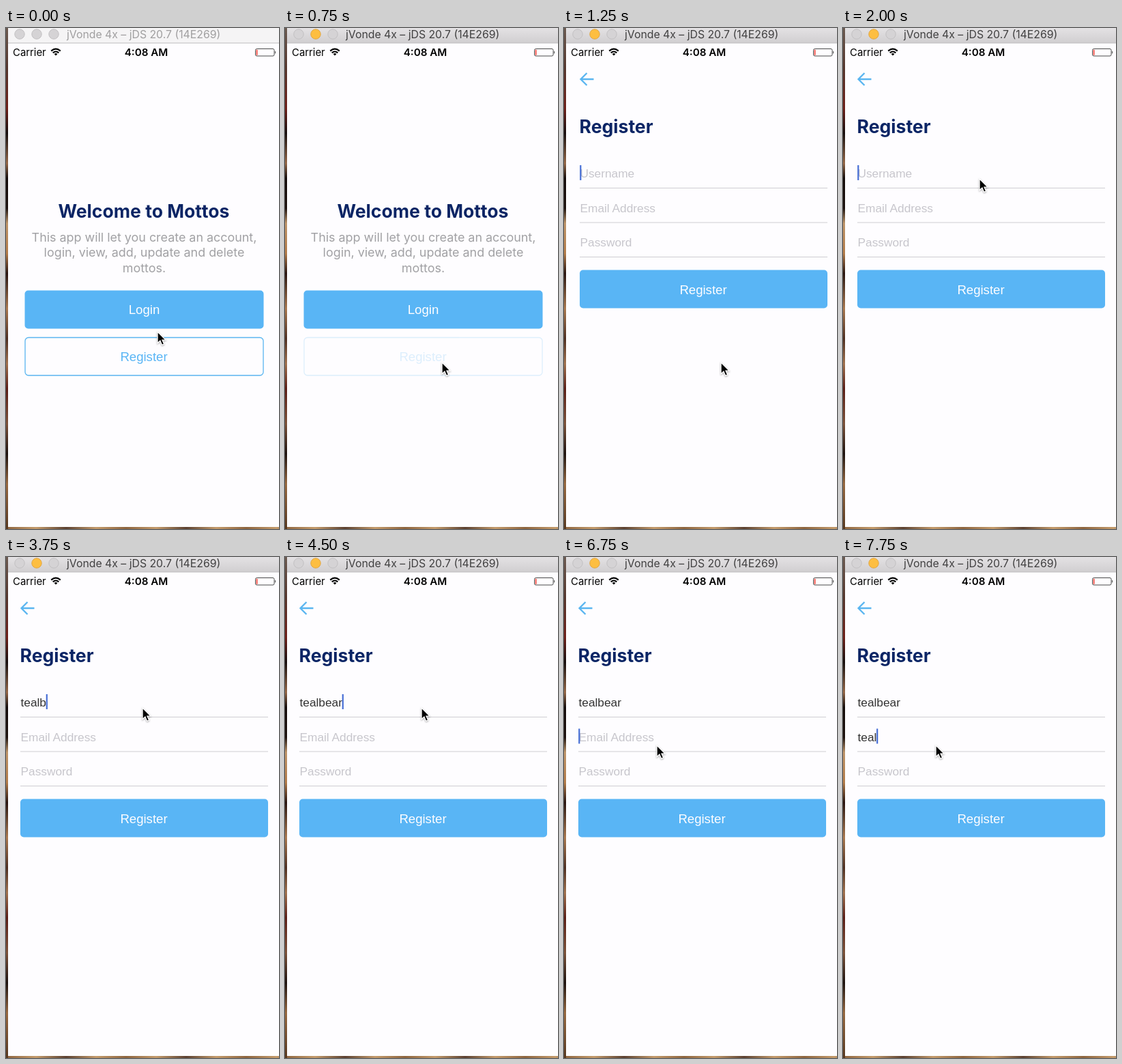
An HTML page that plays this animation: 400x734 px, repeating every 8 s.

```html
<!DOCTYPE html>
<html lang="en">
<head>
<meta charset="utf-8">
<title>Register flow</title>
<style>
  html, body { margin: 0; height: 100%; overflow: hidden; background: #fefdff; }
  svg { display: block; font-family: Inter, sans-serif; }
  .mid { text-anchor: middle; }
  .heading { font-size: 26.6px; font-weight: 700; fill: #0b2565; }
  .intro { font-size: 17.9px; fill: #a1a1a4; }
  .button { font: 18.6px "Liberation Sans", sans-serif; }
  .field { font: 17.3px "Liberation Sans", sans-serif; }
  .blue { fill: #59b5f5; }
  .white { fill: #fefdff; }
  .lights circle { fill: #d5d3d5; stroke: #c2c0c2; }
</style>
</head>
<body>
<svg width="400" height="734" viewBox="0 0 400 734">
  <defs>
    <linearGradient id="side" x1="0" y1="0" x2="0" y2="1">
      <stop offset="0" stop-color="#6b5a50"/>
      <stop offset=".08" stop-color="#54362c"/>
      <stop offset=".16" stop-color="#6d1f18"/>
      <stop offset=".21" stop-color="#140c0b"/>
      <stop offset=".27" stop-color="#946746"/>
      <stop offset=".3" stop-color="#120a08"/>
      <stop offset=".36" stop-color="#1c110d"/>
      <stop offset=".39" stop-color="#bd9468"/>
      <stop offset=".45" stop-color="#b27b48"/>
      <stop offset=".49" stop-color="#27130e"/>
      <stop offset=".56" stop-color="#a9784e"/>
      <stop offset=".62" stop-color="#4d2e20"/>
      <stop offset=".67" stop-color="#a0714d"/>
      <stop offset=".72" stop-color="#5a1d15"/>
      <stop offset=".79" stop-color="#7b5138"/>
      <stop offset=".85" stop-color="#1b100c"/>
      <stop offset=".91" stop-color="#96683f"/>
      <stop offset="1" stop-color="#55371f"/>
    </linearGradient>
    <linearGradient id="floor" spreadMethod="reflect" x2=".22">
      <stop offset="0" stop-color="#8d643e"/>
      <stop offset=".5" stop-color="#c49b6b"/>
      <stop offset="1" stop-color="#5b4030"/>
    </linearGradient>
    <linearGradient id="activeBar" x1="0" y1="0" x2="0" y2="1">
      <stop stop-color="#e4e2e4"/>
      <stop offset="1" stop-color="#d0ced0"/>
    </linearGradient>
    <clipPath id="window"><rect x="3" width="397" height="731"/></clipPath>
  </defs>

  <rect width="400" height="734" fill="url(#floor)"/>
  <rect width="3" height="734" fill="url(#side)"/>

  <g clip-path="url(#window)">
    <rect class="white" width="400" height="731"/>

    <g id="welcome">
      <text class="heading mid" x="202" y="278">Welcome to Mottos</text>
      <g class="intro mid">
        <text x="202.5" y="313">This app will let you create an account,</text>
        <text x="202.5" y="335">login, view, add, update and delete</text>
        <text x="202.5" y="358">mottos.</text>
      </g>
      <rect class="blue" x="27.5" y="384.5" width="350" height="56" rx="5"/>
      <text class="button mid white" x="202.5" y="419">Login</text>
      <g id="registerLink">
        <rect x="28" y="453.5" width="349" height="55.5" rx="5" fill="none" stroke="#59b5f0" stroke-width="1.3"/>
        <text class="button mid blue" x="202" y="488">Register</text>
      </g>
    </g>

    <g id="form">
      <rect class="white" x="3" y="22" width="400" height="712"/>
      <path d="M41.5 75H23M31.5 66L22.5 75L31.5 84" fill="none" stroke="#59b5f0" stroke-width="2.3"/>
      <text class="heading" x="20.5" y="154">Register</text>
      <path d="M21 234.5H384M21 285H384M21 335.5H384" stroke="#cfced2"/>
      <g class="field">
        <text id="username" x="21.5" y="219"></text>
        <text id="email" x="21.5" y="269.5"></text>
        <text x="21.5" y="320" fill="#c7c6cc">Password</text>
      </g>
      <rect id="caret" width="2.2" height="22" fill="#486fd6"/>
      <rect class="blue" x="21" y="354.5" width="363" height="56" rx="5"/>
      <text class="button mid white" x="202" y="389.5">Register</text>
    </g>

    <rect id="bar" x="3" width="397" height="22"/>
    <path d="M3 22H400" stroke="#bcbabc"/>
    <g class="lights">
      <circle cx="20" cy="9" r="7.2"/>
      <circle id="minimize" cx="45" cy="9" r="7.2"/>
      <circle cx="70" cy="9" r="7.2"/>
    </g>
    <text id="title" x="89" y="15" font-size="15.8">jVonde 4x – jDS 20.7 (14E269)</text>

    <text x="10" y="41" font-size="14.9">Carrier</text>
    <g fill="none" stroke="#000" stroke-width="2.1">
      <path d="M66.2 33.6Q73 27.6 79.8 33.6M68.7 36.4Q73 32.6 77.3 36.4"/>
      <path d="M70.6 37.9Q73 36 75.4 37.9L73 40.6Z" fill="#000" stroke="none"/>
    </g>
    <text class="mid" x="205.5" y="41" font-size="15.2" font-weight="600">4:08 AM</text>
    <rect x="365.5" y="30.5" width="27.5" height="10.5" rx="2" fill="none" stroke="#4a4a4a"/>
    <rect x="366.8" y="31.8" width="1.6" height="8" fill="#f0392f"/>
    <path d="M394.2 33.5Q396.2 35.7 394.2 38Z" fill="#333"/>
  </g>

  <path id="pointer" d="M0 0V16.8L3.9 13.2L6.6 19.4L9.6 18.1L7 12.1H12Z" stroke="#fff" stroke-width="1.3"
        style="filter:drop-shadow(0 1px 1px #0005)"/>
</svg>
<script>
const LOOP = 8000, STEP = 250;
const $ = id => document.getElementById(id);
const set = (id, attrs) => {
  for (const name in attrs) $(id).setAttribute(name, attrs[name]);
};

// time, x, y
const pointerPath = [
  [0, 222, 445], [500, 230, 490], [1250, 230, 490], [2000, 200, 221],
  [4500, 200, 221], [5250, 136, 277], [6500, 136, 277], [6750, 136, 276], [LOOP, 136, 276]
];

function pointerAt(t) {
  const i = pointerPath.findIndex(p => p[0] > t);
  const [t0, x0, y0] = pointerPath[i - 1], [t1, x1, y1] = pointerPath[i];
  const u = (t - t0) / (t1 - t0), k = u * u * (3 - 2 * u);
  return [x0 + (x1 - x0) * k, y0 + (y1 - y0) * k];
}

function typeInto(id, word, hint, start, t) {
  const count = Math.max(0, Math.floor((t - start) / STEP));
  $(id).textContent = word.slice(0, count) || hint;
  set(id, { fill: count ? '#333' : '#c7c6cc' });
  return count ? $(id).getComputedTextLength() : 0;
}

function draw(t) {
  const active = t >= 500;
  set('bar', { fill: active ? 'url(#activeBar)' : '#f5f4f5' });
  set('title', { fill: active ? '#414041' : '#a09fa0' });
  $('minimize').style.cssText = active ? 'fill:#fdbe41;stroke:#e2a640' : '';

  const slide = t < 1000 ? 400 : t < 1250 ? 46.5 : t < 1500 ? 2 : 0;
  const progress = 1 - slide / 400;
  const scale = 1 - 0.057 * progress;
  set('form', { transform: `translate(${slide} 0)` });
  set('welcome', {
    transform: `translate(${202 - 12.4 * progress} 376) scale(${scale}) translate(-202 -376)`,
    opacity: 1 - 0.68 * progress
  });
  set('registerLink', { opacity: t === 750 ? 0.2 : t === 1000 ? 0.6 : 1 });

  const nameWidth = typeInto('username', 'tealbear', 'Username', 2500, t);
  const mailWidth = typeInto('email', 'teal', 'Email Address', 6750, t);
  const onEmail = t >= 5500;
  const typing = t >= 2750 && t <= 4500 || t >= 7000;
  const lit = typing || (t - (onEmail ? 5500 : 1000)) % 1000 < 500;
  set('caret', {
    x: 21.2 + (onEmail ? mailWidth : nameWidth),
    y: onEmail ? 251.5 : 201,
    opacity: lit ? 1 : 0
  });

  set('pointer', { transform: `translate(${pointerAt(t)})` });
}

function tick() {
  draw(Math.floor(performance.now() % LOOP / STEP) * STEP);
  requestAnimationFrame(tick);
}
tick();
</script>
</body>
</html>
```
